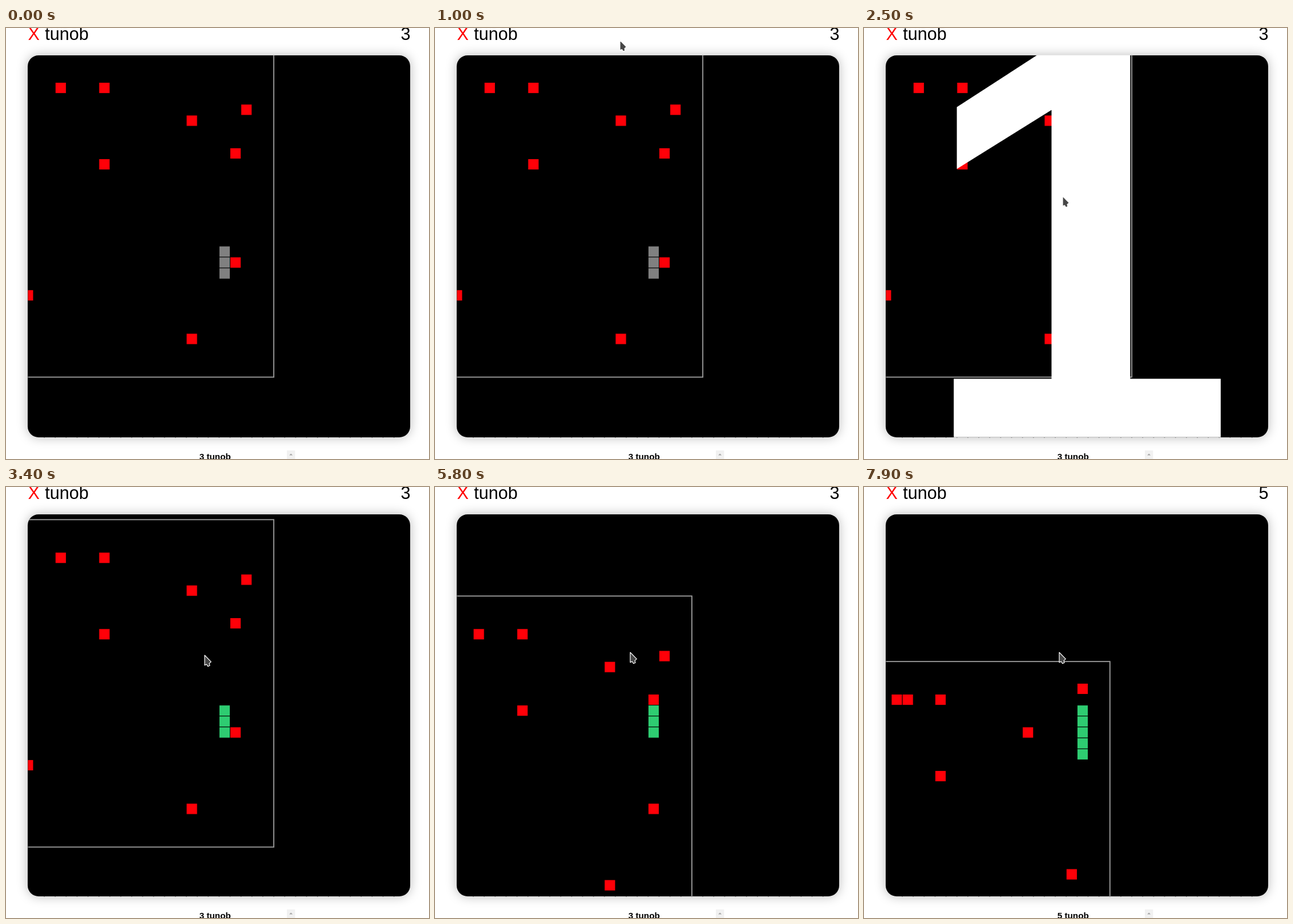
Recreate the animation shown at these times as an HTML page. Size 741x756 px, loop 8 s.

```html
<!DOCTYPE html>
<html lang="en">
<head>
<meta charset="utf-8">
<title>Snake</title>
<style>
  html, body { margin: 0; width: 100%; height: 100%; overflow: hidden; background: #fff; }
  #board {
    position: absolute; left: 38.4px; top: 47.7px; width: 670px; height: 670px;
    border-radius: 19.1px; background: #000; box-shadow: 0 0 19px rgba(0, 0, 0, .28);
  }
  svg { position: absolute; left: 0; top: 0; display: block; }
  text { font-family: "Liberation Sans", Arial, sans-serif; }
  .head { font-size: 30.6px; }
  .list { font-size: 15.3px; font-weight: bold; text-anchor: middle; }
  #digit { font-size: 1005px; font-weight: bold; text-anchor: middle; fill: #fff; }
  #cells rect { stroke: #000; stroke-width: .96; }
</style>
</head>
<body>
<div id="board"></div>
<svg width="741" height="756" viewBox="0 0 741 756">
  <clipPath id="clip"><rect x="38.4" y="47.7" width="670" height="670.4" rx="19.1"/></clipPath>
  <text class="head" x="38.4" y="21" fill="red">X</text>
  <text class="head" x="68.2" y="21">tunob</text>
  <text class="head" id="score" x="708.4" y="21" text-anchor="end"></text>
  <path d="M66.3 717.9H690" stroke="#000" stroke-width=".9" stroke-dasharray="1.6 17.543"/>
  <g clip-path="url(#clip)">
    <rect id="wall" fill="none" stroke="#999" stroke-width="1.9"/>
    <g id="cells"></g>
    <text id="digit" x="373.4" y="717.8"></text>
  </g>
  <text class="list" id="rank" x="366.3" y="757"></text>
  <rect x="492" y="741" width="14.4" height="15" fill="#f1f1f1"/>
  <path d="M496.2 749.6L499.2 746.6L502.2 749.6Z" fill="#a3a3a3"/>
  <path id="cursor" d="M0 0L11.3 11.6L8 14.6L9 18.2L5.6 19.6L3.4 16L0 17.6Z"
        fill="#474747" stroke="#fff" stroke-width="1.2" stroke-linejoin="round"/>
</svg>
<script>
const LOOP = 8000, CELL = 670 / 35, LEFT = 38.4, TOP = 47.7, MID = 18;
const WORLD = { x: -7.5, y: -0.5, size: 30 };
const FOOD = [[3, 3], [7, 3], [15, 6], [20, 5], [19, 9], [7, 10], [19, 19], [0, 22], [15, 26]];
const SPAWN = [[4, 3], [20, 2]];
const MOVES = "UUUUURUUUUURUUUU", FIRST_MOVE = 3400, TICK = 300, READY = 3100;
// time, x, y of the pointer tip
const POINTER = [
  [1000, 324, 21.5], [1100, 331, 100], [1200, 339, 192], [1300, 346, 268],
  [1400, 348, 295], [5300, 345, 292.5], [5400, 342, 290]
];

const $ = id => document.getElementById(id);
const set = (el, attrs) => { for (const k in attrs) el.setAttribute(k, attrs[k]); };
const same = (a, b) => a[0] === b[0] && a[1] === b[1];

function play(steps) {
  let food = FOOD.slice(), eaten = 0;
  const snake = [[18, 18], [18, 19], [18, 20]];
  for (const move of MOVES.slice(0, steps)) {
    const [x, y] = snake[0];
    const head = move === "U" ? [x, y - 1] : [x + 1, y];
    snake.unshift(head);
    if (food.some(f => same(f, head))) {
      food = food.filter(f => !same(f, head));
      food.push(SPAWN[eaten++]);
    } else snake.pop();
  }
  return { snake, food };
}

function draw(t) {
  const steps = Math.max(0, Math.floor((t - FIRST_MOVE) / TICK) + 1);
  const { snake, food } = play(steps);
  const [hx, hy] = snake[0];
  const px = x => LEFT + (x - hx + MID) * CELL;
  const py = y => TOP + (y - hy + MID) * CELL;
  const square = fill => ([x, y]) =>
    `<rect x="${px(x - .5)}" y="${py(y - .5)}" width="${CELL}" height="${CELL}" fill="${fill}"/>`;

  set($("wall"), {
    x: px(WORLD.x), y: py(WORLD.y),
    width: WORLD.size * CELL, height: WORLD.size * CELL
  });
  $("cells").innerHTML = food.map(square("#ff0008")).join("") +
    snake.map(square(t < READY ? "#808080" : "#2ecc71")).join("");

  const count = Math.floor((t - 100) / 600);
  const lit = t >= 100 && count < 5 && (t - 100) % 600 < 300;
  $("digit").textContent = lit ? 5 - count : "";

  $("score").textContent = snake.length;
  $("rank").textContent = snake.length + " tunob";

  const at = POINTER.filter(p => p[0] <= t).pop();
  set($("cursor"), at
    ? { transform: `translate(${at[1]} ${at[2]})`, visibility: "visible" }
    : { visibility: "hidden" });
}

const start = performance.now();
function frame() {
  draw((performance.now() - start) % LOOP);
  requestAnimationFrame(frame);
}
frame();
</script>
</body>
</html>
```
